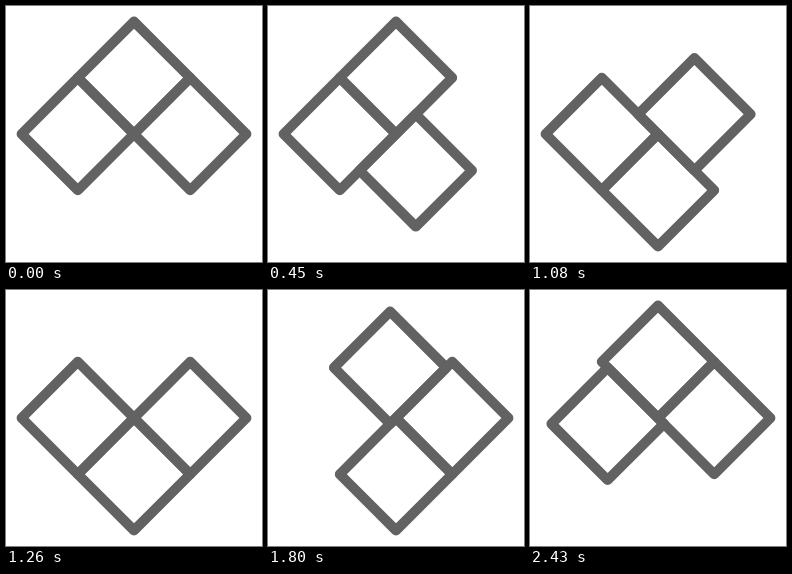
Recreate the animation shown at these times as an HTML page with a canvas. Size 256 px wide and 256 px high, loop 2.52 s.

```html
<!DOCTYPE html>
<html>
<head>
<meta charset="utf-8">
<style>
  html, body { margin: 0; height: 100%; overflow: hidden; background: #fff; }
  canvas { display: block; }
</style>
</head>
<body>
<canvas id="stage" width="256" height="256"></canvas>
<script>
const ctx = document.getElementById('stage').getContext('2d');
const STEP = 90, PHASE = 630, LOOP = 4 * PHASE, REST = 180;
const R = 56.2; // half diagonal of a square
const SLOTS = [[0, -1], [1, 0], [0, 1], [-1, 0]]; // top, right, bottom, left

function diamond([x, y]) {
  const cx = 128 + x * R, cy = 128 + y * R;
  ctx.beginPath();
  for (const [dx, dy] of SLOTS) ctx.lineTo(cx + dx * R, cy + dy * R);
  ctx.closePath();
  ctx.stroke();
}

function draw(time) {
  const t = Math.floor(time % LOOP / STEP) * STEP;
  const phase = Math.floor(t / PHASE);
  const u = Math.max(0, (t % PHASE - REST) / (PHASE - REST));
  const k = u * u * (3 - 2 * u);
  const mover = (5 - phase) % 4, gap = (mover + 1) % 4;

  ctx.clearRect(0, 0, 256, 256);
  ctx.strokeStyle = '#616261';
  ctx.lineWidth = 10;
  ctx.lineJoin = 'round';
  SLOTS.forEach((slot, i) => {
    if (i === gap) return;
    diamond(i === mover ? slot.map((v, j) => v + (SLOTS[gap][j] - v) * k) : slot);
  });
}

const start = performance.now();
function tick() {
  draw(performance.now() - start);
  requestAnimationFrame(tick);
}
tick();
</script>
</body>
</html>
```
